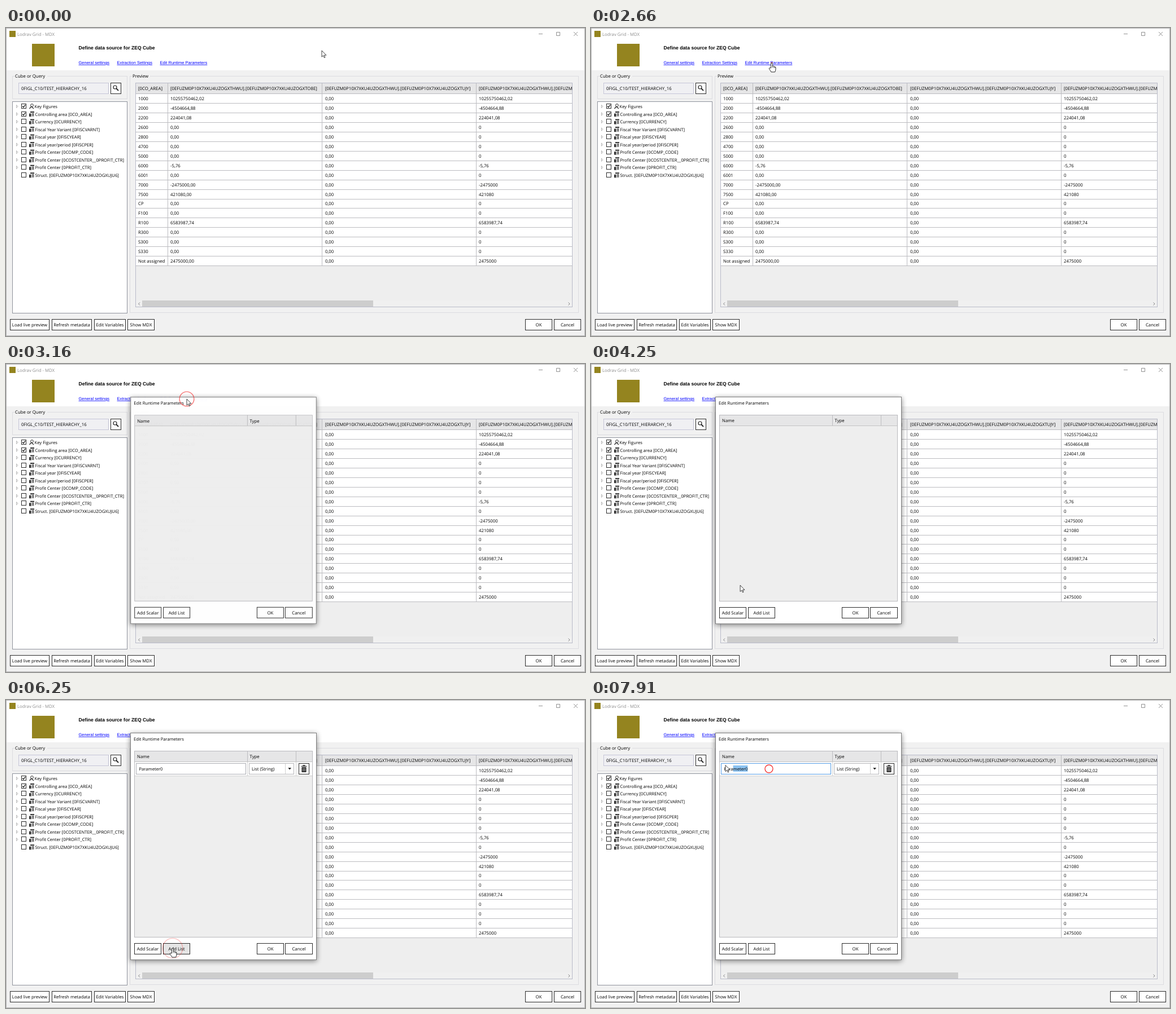
Animation of 1025x546 px, one loop 8 s. Source, as an HTML page:

```html
<!DOCTYPE html>
<html lang="en">
<head>
<meta charset="utf-8">
<title>Edit Runtime Parameters</title>
<style>
  html, body { margin: 0; width: 100%; height: 100%; overflow: hidden; background: #fff; }
  svg { display: block; }
  text { font: 7.8px "Open Sans", "Noto Sans", sans-serif; fill: #000; text-rendering: geometricPrecision; white-space: pre; }
  .title { fill: #8c8c8c; }
  .narrow { font-size: 7.65px; }
  .heading { font: bold 8.65px "Liberation Sans", Arial, sans-serif; }
  .link { font: 7.5px "Liberation Sans", Arial, sans-serif; fill: #00f; text-decoration: underline; }
  .mid { text-anchor: middle; }
  .shadow { filter: drop-shadow(0 2px 5px #0007); }
</style>
</head>
<body>
<svg id="stage" width="1025" height="546" viewBox="0 0 1025 546"></svg>
<script>
const LOOP = 8000;
const INK = '#2b2b2b', PANEL = '#f1f1f1', GRID = '#eeeeee', HEAD = '#e6e6e7', RULE = '#bcbcc0', GOLD = '#94841f';

// Drawing helpers: every one returns SVG markup.
const text = (x, y, s, cls = '', extra = '') => `<text x="${x}" y="${y}" class="${cls}" ${extra}>${s}</text>`;
const fill = (x, y, w, h, color) => `<rect x="${x}" y="${y}" width="${w}" height="${h}" fill="${color}"/>`;
const box = (x, y, w, h, color, stroke, extra = '') =>
  `<rect x="${x + .5}" y="${y + .5}" width="${w - 1}" height="${h - 1}" fill="${color}" stroke="${stroke}" ${extra}/>`;
const path = (d, stroke, width = 1, color = 'none') =>
  `<path d="${d}" stroke="${stroke}" stroke-width="${width}" fill="${color}"/>`;
const hline = (x1, x2, y, color = RULE) => path(`M${x1} ${y + .5}H${x2}`, color);
const vline = (x, y1, y2, color = RULE) => path(`M${x + .5} ${y1}V${y2}`, color);
const button = (x, y, w, label, id = '') =>
  box(x, y, w, 20, '#fff', INK, id && `id="${id}"`) + text(x + w / 2, y + 13, label, 'mid');
const group = (x, y, w, h, label, labelWidth) =>
  box(x, y, w, h, 'none', '#dcdce0') + fill(x + 4, y - 1, labelWidth, 3, PANEL) + text(x + 5, y + 2.5, label);

function titleBar() {
  return fill(0, 0, 1025, 75, '#fff') +
    fill(6, 5, 11, 11, GOLD) + text(20, 13.5, 'Lodrav Grid - MDX', 'title') +
    path('M943 10.5H950M974.5 7.5H980.5V13.5H974.5ZM1005 7L1012 14M1012 7L1005 14', '#777', .8) +
    fill(46, 28, 40, 40, GOLD) +
    text(128.5, 38, 'Define data source for ZEQ Cube', 'heading') +
    text(128.5, 64.2, 'General settings', 'link') +
    text(196.5, 64.2, 'Extraction Settings', 'link') +
    text(272.5, 64.2, 'Edit Runtime Parameters', 'link');
}

function treeItem(label, i) {
  const y = 139 + 13.53 * i, top = Math.round(y) - 5;
  const icon = i === 0
    ? path(`M41.5 ${y + 4}L45 ${y}M45 ${y}L49 ${y + 4}`, INK, 1.3) + `<circle cx="46" cy="${y - 2}" r="2.4" fill="#fff" stroke="${INK}"/>`
    : fill(43, y - 4.5, 7, 2, INK) + fill(41, y - 1, 4, 5.5, INK) + fill(46, y - 1.5, 3.5, 5.5, '#555') +
      path(`M44 ${y - 2.5}V${y + 4}M46 ${y + .5}H49.5M46 ${y + 2.5}H49.5`, '#ddd', .6);
  return (i < 9 ? path(`M18.5 ${y - 2.6}L21.2 ${y}L18.5 ${y + 2.6}Z`, '#a6a6a6', .8, '#fff') : '') +
    box(27, top, 9, 9, '#fff', INK) +
    (i < 2 ? path(`M29 ${top + 4.5}L31 ${top + 6.5}L34.3 ${top + 2.2}`, '#111', 1.2) : '') +
    icon + text(i ? 51.5 : 50.5, y + 3, label, 'narrow');
}

function leftPane() {
  const items = ['Key Figures', 'Controlling area [0CO_AREA]', 'Currency [0CURRENCY]', 'Fiscal Year Variant [0FISCVARNT]',
    'Fiscal year [0FISCYEAR]', 'Fiscal year/period [0FISCPER]', 'Profit Center [0COMP_CODE]',
    'Profit Center [0COSTCENTER__0PROFIT_CTR]', 'Profit Center [0PROFIT_CTR]', 'Struct. [0EFUZM0P10X7XKU4UZOGXUJU6]'];
  return group(11, 85, 204, 41, 'Cube or Query', 58) +
    box(22, 97, 160, 20, '#f0f0f3', '#c6c6d8') + text(27, 109.5, '0FIGL_C10/TEST_HIERARCHY_16') +
    box(185, 97, 19, 20, '#fff', INK) +
    '<circle cx="193" cy="105" r="3" fill="none" stroke="#222" stroke-width="1.2"/>' + path('M195.2 107.2L199 111', '#222', 1.9) +
    box(11, 130, 204, 376, '#fff', '#8f939d') + items.map(treeItem).join('');
}

function previewPane() {
  const key = '[0EFUZM0P10X7XKU4UZOGXTHWU].[0EFUZM0P10X7XKU4UZOGX';
  const columns = [234, 291, 565, 837];
  const heads = ['[0CO_AREA]', key + 'TO8E]', key + 'TUJY]', key + 'TO8E]'];
  const areas = '1000,2000,2200,2600,2800,4700,5000,6000,6001,7000,7500,CP,F100,R100,R300,S300,S330,Not assigned'.split(',');
  const values = { 1000: '10255750462,02', 2000: '-4504664,88', 2200: '224041,08', 6000: '-5,76', 7000: '-2475000,00',
    7500: '421080,00', R100: '6583987,74', 'Not assigned': '2475000,00' };
  const rows = areas.map((area, i) => {
    const value = values[area] || '0,00';
    const bottom = Math.round(116.2 + 16.94 * (i + 1));
    return [area, value, '0,00', value.replace(',00', '')]
      .map((s, c) => text(columns[c], bottom - 4.8, s)).join('') + hline(229, 1003, bottom);
  }).join('');
  return group(219, 85, 795, 420, 'Preview', 32) +
    '<clipPath id="table"><rect x="229" y="97" width="774" height="398"/></clipPath><g clip-path="url(#table)">' +
    fill(229, 97, 774, 398, GRID) + fill(229, 97, 774, 20, HEAD) + fill(229, 117, 774, 304, '#fff') +
    heads.map((s, c) => text(columns[c], 110.3, s)).join('') + hline(229, 1003, 116) + rows +
    [286, 559, 832].map(x => vline(x, 97, 421)).join('') +
    fill(230, 483, 772, 11, '#f0f0f0') + fill(241, 483, 409, 12, '#cdcdcd') +
    path('M237 486.5L234.5 489L237 491.5M995.5 486.5L998 489L995.5 491.5', '#777', .9) +
    '</g>' + box(229, 97, 774, 398, 'none', '#b9bbc9');
}

function parameterRow() {
  return fill(228, 110, 314, 24, '#fff') + hline(228, 542, 134, '#cfcfcf') +
    vline(427, 110, 134, '#d4d4d4') + vline(513, 110, 134, '#d4d4d4') +
    box(230, 112, 195, 20, '#fff', '#abadb3', 'id="field"') +
    '<rect id="selection" y="116" height="11" fill="#8cc2f0"/>' + text(235.5, 124.7, 'Parameter0', 'narrow', 'id="name"') +
    box(430, 112, 80, 20, '#fff', '#b5b5b8') + text(435, 124.7, 'List (String)') + vline(494, 113, 131, '#d0d0d0') +
    path('M499.3 120.3H505L502.2 123.6Z', 'none', 0, '#111') +
    box(518, 112, 19, 20, '#fff', INK) +
    path('M522.5 117.5H532.5M526 117V115.8H529V117', '#222', 1.2) + fill(523.5, 119, 8, 9, '#222') +
    path('M525.6 120.3V126.5M527.5 120.3V126.5M529.4 120.3V126.5', '#fff', .6);
}

function dialog() {
  return box(220, 58, 330, 403, '#fff', '#7d7d7d', 'class="shadow"') + text(226, 72, 'Edit Runtime Parameters', 'narrow') +
    box(227, 90, 316, 331, GRID, '#b9b9bd') + fill(228, 91, 314, 18, HEAD) + hline(228, 542, 109, '#c4c4c4') +
    vline(427, 90, 109) + vline(513, 90, 109) + text(232, 103.3, 'Name') + text(431.5, 103.3, 'Type') +
    `<g id="row">${parameterRow()}</g>` +
    button(227, 431, 48, 'Add Scalar') + button(278, 431, 48, 'Add List', 'addList') +
    button(444, 431, 48, 'OK') + button(494, 431, 49, 'Cancel');
}

const arrow = path('M0 0V11.3L2.6 8.8L4.3 12.7L6 12L4.3 8.2H7.9Z', '#111', .8, '#fff');
const hand = path('M-1.4 9V1.2A1.4 1.4 0 0 1 1.4 1.2V5.6Q3.2 5 3.6 6.2Q5.2 5.6 5.5 7Q7 6.6 7 8.2V11Q7 13 5.6 16H-1Q-2.4 13.5 -4.6 10.4Q-4.9 8.4 -3.3 8.7Z', '#111', .9, '#fff') +
  path('M1.4 5.5V8.5M3.6 6.5V8.7M5.5 7.2V9', '#111', .7);

document.getElementById('stage').innerHTML =
  fill(0, 0, 1025, 546, PANEL) + titleBar() + leftPane() + previewPane() +
  button(7, 516, 70, 'Load live preview') + button(81, 516, 71, 'Refresh metadata') +
  button(156, 516, 56, 'Edit Variables') + button(215, 516, 48, 'Show MDX') +
  button(919, 516, 48, 'OK') + button(970, 516, 48, 'Cancel') +
  box(0, 0, 1025, 546, 'none', '#b4b4b4') +
  `<g id="dialog">${dialog()}</g>` +
  '<circle id="ring" fill="none" stroke="#f02020" stroke-width="1.4"/>' +
  `<g id="cursor"><g id="arrow">${arrow}</g><g id="hand">${hand}</g></g>`;

const el = id => document.getElementById(id);
const show = (id, on) => el(id).setAttribute('visibility', on ? 'inherit' : 'hidden');
const set = (id, attrs) => { for (const k in attrs) el(id).setAttribute(k, attrs[k]); };

const linear = u => u;
const smooth = u => u * u * (3 - 2 * u);
const easeIn = u => u ** 3;
const easeOut = u => 1 - (1 - u) ** 3;

// Pointer path: time, x, y, easing of the leg that arrives there.
const track = [
  [0, 559, 40, linear], [250, 559, 40, linear], [1080, 418, 76.5, easeIn], [1160, 377.5, 79, linear],
  [1910, 320, 64, easeOut], [1990, 320, 64, linear], [2080, 320, 62, linear], [3430, 320, 62, linear],
  [4000, 260, 345, smooth], [4250, 264, 392, easeOut], [5080, 295, 440, easeOut], [6330, 295, 440, linear],
  [6660, 318, 420, smooth], [6750, 318, 420, linear], [7580, 315, 122, smooth], [7640, 315, 122, linear],
  [7910, 238, 115.5, smooth], [LOOP, 238, 115.5, linear]
];
const presses = [[2625, 320, 62], [5515, 295, 440], [7620, 315, 122]];
const RING_MS = 800;

function pointerAt(t) {
  const i = track.findIndex(k => k[0] > t);
  const [t0, x0, y0] = track[i - 1], [t1, x1, y1, ease] = track[i];
  const u = ease((t - t0) / (t1 - t0));
  return [x0 + (x1 - x0) * u, y0 + (y1 - y0) * u];
}

function drawSelection(t, x) {
  const name = el('name'), end = name.getEndPositionOfChar(9).x;
  let start = end;
  for (let i = 9; i >= 4 && t > 7640; i--) {
    const left = name.getStartPositionOfChar(i).x;
    if (left > x) start = left;
  }
  set('selection', { x: start, width: end - start });
}

function render(t) {
  const [x, y] = pointerAt(t);
  const onLink = t > 1800 && t < 2950, onButton = t > 4250 && y > 431;
  set('cursor', { transform: `translate(${x} ${y})` });
  show('hand', onLink || onButton);
  show('arrow', !onLink && !onButton);

  const press = presses.find(p => t >= p[0] && t < p[0] + RING_MS);
  show('ring', press);
  if (press) {
    const age = t - press[0];
    set('ring', { cx: press[1], cy: press[2], r: age * .024, opacity: 1 - .85 * (age / RING_MS) ** 2 });
  }

  const open = easeOut(Math.min(1, Math.max(0, (t - 2950) / 280)));
  show('dialog', open > 0);
  set('dialog', { opacity: open, transform: `translate(385 260) scale(${.9 + .1 * open}) translate(-385 -260)` });
  show('row', open > 0 && t > 5700);
  set('addList', { fill: onButton || (t > 6000 && t < 6750) ? '#e5e5e5' : '#fff' });
  set('field', { stroke: t > 7620 ? '#569de5' : t > 6750 && y < 131 ? '#7eb4ea' : '#abadb3' });
  drawSelection(t, x);
}

function tick() {
  render(performance.now() % LOOP);
  requestAnimationFrame(tick);
}
tick();
</script>
</body>
</html>
```
